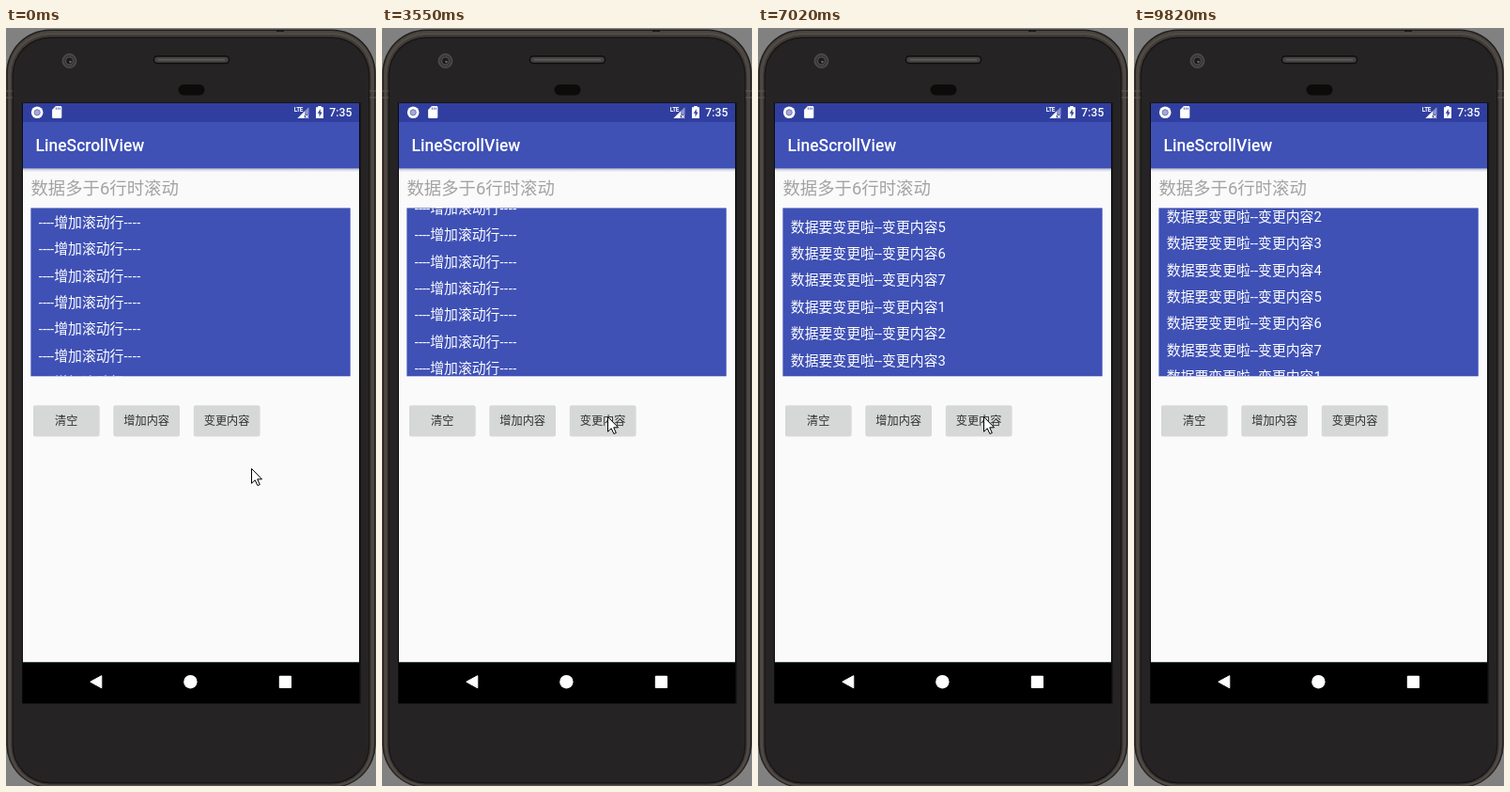
An HTML page for the animation above (9920 ms loop, 394 px wide and 806 px high).

```html
<!DOCTYPE html>
<html lang="zh-CN">
<head>
<meta charset="utf-8">
<style>
html, body { margin: 0; width: 100%; height: 100%; overflow: hidden; background: #818181; }
svg { display: block; width: 394px; height: 806px; }
text { font-family: Roboto, 'Noto Sans CJK SC', 'Noto Sans CJK', sans-serif; white-space: pre; }
.btn text { font-size: 12.2px; font-weight: 500; fill: #303131; text-anchor: middle; }
</style>
</head>
<body>
<svg viewBox="0 0 394 806">
  <defs>
    <clipPath id="panelClip"><rect x="26" y="191.3" width="341" height="179"/></clipPath>
    <linearGradient id="shade" x2="0" y2="1">
      <stop offset="0" stop-color="#2b3470" stop-opacity=".3"/>
      <stop offset="1" stop-color="#2b3470" stop-opacity="0"/>
    </linearGradient>
  </defs>

  <!-- phone body -->
  <rect width="394" height="806" fill="#818181"/>
  <g id="body"></g>
  <path d="M0 67h7M0 74h7M387 67h7M387 74h7" stroke="#5d5955"/>
  <path d="M288 3h8" stroke="#191716" stroke-width="2"/>
  <circle cx="67.5" cy="35" r="7.2" fill="#3b3939" stroke="#4e4b4b" stroke-width="1.5"/>
  <circle cx="67.5" cy="35" r="4" fill="#1c1a1b" stroke="#565354"/>
  <circle cx="68.5" cy="36" r="1.2" fill="#6f6c6d"/>
  <rect x="157.5" y="30" width="80" height="7.5" rx="3.7" fill="#454241" stroke="#0e0d0d" stroke-width="1.4"/>
  <path d="M162 33.8h71" stroke="#5a5756" stroke-width="2"/>
  <rect x="183.5" y="60" width="28" height="11.5" rx="5.7" fill="#0d0b0a"/>

  <!-- screen -->
  <rect x="17" y="79.5" width="360.5" height="639" fill="#0b0b0c"/>
  <rect x="18" y="149" width="358" height="525" fill="#fafafa"/>
  <rect x="18" y="80" width="358" height="20" fill="#303f9f"/>
  <rect x="18" y="100" width="358" height="49.4" fill="#3f51b5"/>
  <rect x="18" y="149.4" width="358" height="3.6" fill="url(#shade)"/>
  <rect x="18" y="674" width="358" height="44" fill="#000"/>
  <rect x="18" y="674" width="358" height="1" fill="#3c574b"/>

  <!-- status bar -->
  <circle cx="33.2" cy="89.8" r="6.3" fill="#fff"/>
  <circle cx="33.2" cy="89.8" r="3.1" fill="#a3abd3" stroke="#6470b4" stroke-width=".9"/>
  <path d="M53 83h5q1.3 0 1.3 1.3v10.4q0 1.3-1.3 1.3h-7.600q-1.300 0-1.300-1.300V87z" fill="#fff"/>
  <path d="M53.4 84.5v2.3M55.4 84.5v2.3M57.4 84.5v2.3" stroke="#303f9f" stroke-width=".8"/>
  <path d="M310.5 96L322.5 84V96z" fill="#8d96cb"/>
  <path d="M310.5 96L318 88.5V96z" fill="#fff"/>
  <path d="M318.5 92.5l3.6 3.6m0-3.6l-3.6 3.6" stroke="#303f9f" stroke-width="3"/>
  <path d="M318.8 92.7l3.2 3.2m0-3.2l-3.2 3.2" stroke="#fff" stroke-width="1.1"/>
  <text x="306.8" y="88.7" font-size="6.3" font-weight="700" fill="#fff" letter-spacing="-.4">LTE</text>
  <path d="M332.2 84.2v-1.2h3.6v1.2h2.2v11.8h-8V84.2z" fill="#fff"/>
  <path d="M334.8 86l-3 4.8h1.800v3.600l3-4.900h-1.800z" fill="#303f9f"/>
  <text x="344.3" y="94.4" font-size="12.2" font-weight="500" fill="#fff">7:35</text>

  <text x="31.5" y="131.3" font-size="17.5" font-weight="500" fill="#fff">LineScrollView</text>
  <text x="26.4" y="177.3" font-size="18.4" fill="#a3a3a3">数据多于6行时滚动</text>

  <rect x="26.4" y="191.4" width="340.3" height="178.9" fill="#3f51b5"/>
  <g clip-path="url(#panelClip)"><g id="rows" font-size="14.85" fill="#fff"></g></g>
  <g id="buttons"></g>

  <!-- navigation -->
  <path d="M89.8 695.2L101.8 688.7V701.8z" fill="#fff" stroke="#fff" stroke-linejoin="round"/>
  <circle cx="196.4" cy="695.2" r="7.2" fill="#fff"/>
  <rect x="290.8" y="688.8" width="13.2" height="13.2" rx="1" fill="#fff"/>

  <path id="cursor" d="M.5.5V16.2L4.2 12.7 6.9 18.5 9.300 17.500 6.700 11.800H11.500z" fill="#fff" stroke="#000" stroke-linejoin="round"/>
</svg>
<script>
const LOOP = 9920, STEP = 59.16, LAST = 166;
const PITCH = 28.4, COUNT = 7;
const SWAP = 75;                      // step at which the new data arrives
const RATE = 2.615, RATE_NEW = 2.592; // pixels per step before and after it
const PRESS = [4230, 4620];
const NS = 'http://www.w3.org/2000/svg';
const $ = id => document.getElementById(id);

function add(parent, tag, attrs, text) {
  const el = document.createElementNS(NS, tag);
  for (const k in attrs) el.setAttribute(k, attrs[k]);
  if (text) el.textContent = text;
  return parent.appendChild(el);
}

// nested shells from the outer rim to the glass: left inset, top, bottom, colour
[
  [.2, 1.5, 808, '#211f1d'],
  [1.8, 3, 807, '#4a4540'],
  [3.6, 5.5, 806, '#544f49'],
  [4.8, 7, 805, '#403b37'],
  [6.6, 9.5, 803.5, '#181616'],
  [8, 11, 802, '#252324']
].forEach(([inset, top, bottom, fill]) => add($('body'), 'rect', {
  x: inset, y: top, width: 394 - 2 * inset, height: bottom - top, rx: 47 - inset, fill
}));

function button(x, label) {
  const g = add($('buttons'), 'g', { class: 'btn' });
  add(g, 'rect', { x, y: 402, width: 70.5, height: 32.6, rx: 2, fill: '#000', opacity: .12 });
  const face = add(g, 'rect', { x, y: 401.2, width: 70.5, height: 32.6, rx: 2, fill: '#d6d7d7' });
  add(g, 'text', { x: x + 35.2, y: 421.8 }, label);
  return face;
}
button(29, '清空');
button(114.5, '增加内容');
const changeBtn = button(199.9, '变更内容');

// each row is a label and a slightly looser tail
const rows = Array.from({ length: 8 }, () => {
  const el = add($('rows'), 'text', { x: 34.8 });
  return { el, label: add(el, 'tspan'), tail: add(el, 'tspan', { 'letter-spacing': .5 }) };
});

// pointer way-points: time, x, y
const path = [
  [0, 261, 468], [2480, 261, 468], [2590, 262, 465], [2850, 256, 450],
  [3080, 244, 426], [3300, 240, 413], [8350, 240, 413], [8600, 268, 500],
  [8950, 362, 806], [LOOP, 362, 830]
];
function pointer(t) {
  let i = 1;
  while (i < path.length - 1 && t > path[i][0]) i++;
  const a = path[i - 1], b = path[i], p = (t - a[0]) / (b[0] - a[0]);
  return [1, 2].map(k => Math.round(a[k] + (b[k] - a[k]) * p));
}

function draw(now) {
  const t = now % LOOP;
  const step = Math.min(LAST, Math.floor((t + 18) / STEP));
  const held = step * STEP;
  const changed = step >= SWAP;
  const scroll = .3 + RATE * Math.min(step, SWAP) + RATE_NEW * Math.max(0, step - SWAP);
  const first = Math.floor(scroll / PITCH);
  rows.forEach(({ el, label, tail }, i) => {
    const n = first + i;
    el.setAttribute('y', (212 + n * PITCH - scroll).toFixed(2));
    label.textContent = changed ? '数据要变更啦--变更内容' + (n % COUNT + 1) : '----增加滚动行';
    tail.textContent = changed ? '' : '----';
  });
  const pressed = held >= PRESS[0] && held < PRESS[1];
  changeBtn.setAttribute('fill', pressed ? '#bfc0c0' : '#d6d7d7');
  $('cursor').setAttribute('transform', `translate(${pointer(held)})`);
}

const start = performance.now();
function tick() {
  draw(performance.now() - start);
  requestAnimationFrame(tick);
}
draw(0);
requestAnimationFrame(tick);
</script>
</body>
</html>
```
